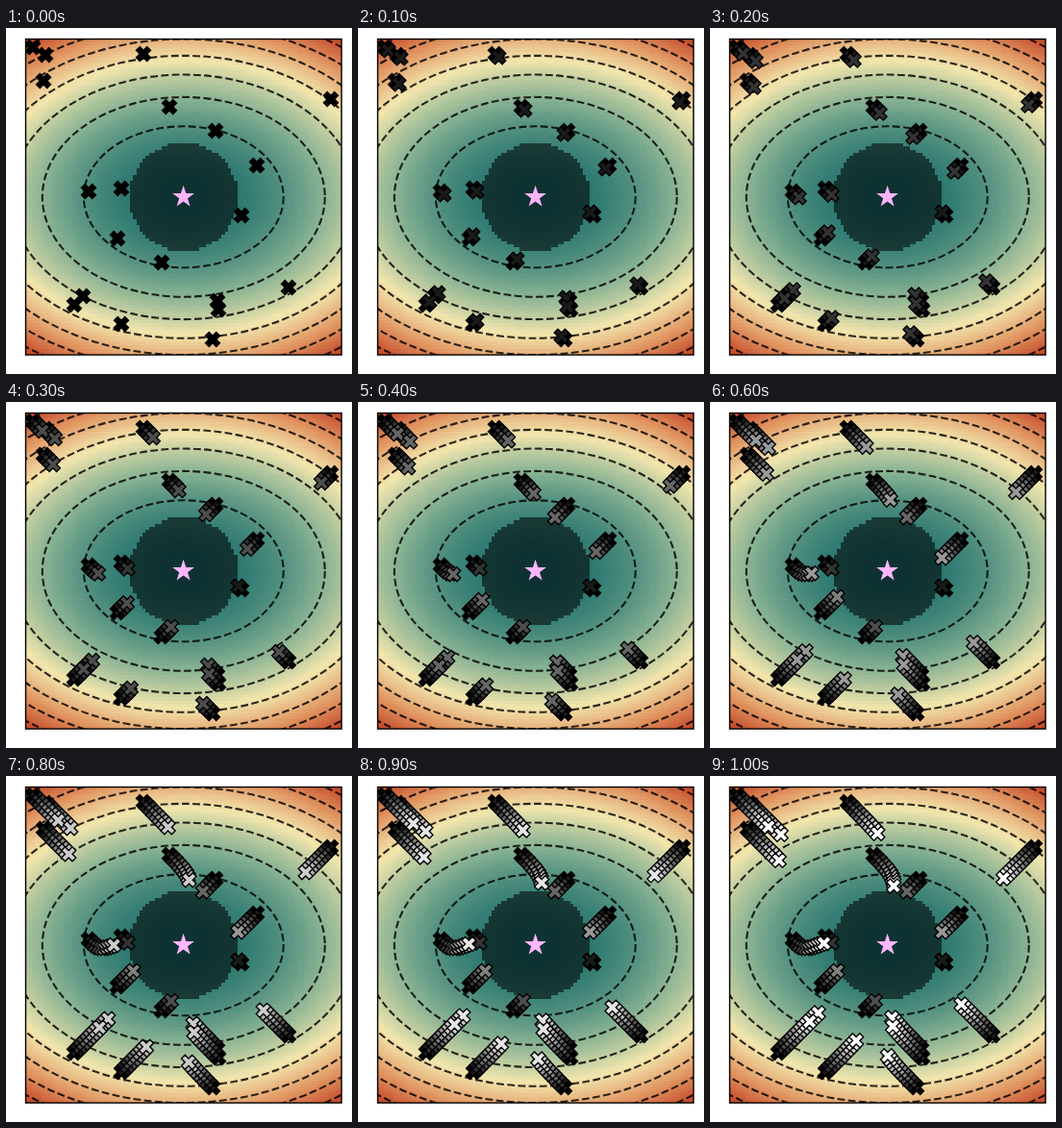
These frames come from a looping animation (360 px wide and 360 px high, 1.1 s). An HTML page with a canvas:

```html
<!DOCTYPE html>
<html>
<head>
<meta charset="utf-8">
<style>
html, body { margin: 0; width: 100%; height: 100%; overflow: hidden; background: #fff; }
canvas { display: block; width: 360px; height: 360px; }
</style>
</head>
<body>
<canvas></canvas>
<script>
const canvas = document.querySelector('canvas');
const ratio = window.devicePixelRatio || 1;
canvas.width = canvas.height = 360 * ratio;
const ctx = canvas.getContext('2d');

const left = 20.5, topEdge = 11.5, size = 328.6, cells = 100;
const cx = left + size / 2, cy = topEdge + size / 2;
const steps = 10, lr = 3.3, stopRadius = 60.5;

// Where each point begins its descent
const starts = [
  [28, 20], [41, 28], [39, 55], [143, 27], [170, 82], [338, 74], [218, 107],
  [261, 143], [86, 170], [120, 167], [245, 195], [116, 219], [162, 244],
  [80, 279], [71, 288], [120, 308], [220, 284], [221, 293], [294, 270], [215, 324]
];

function polygon(points) {
  const path = new Path2D();
  points.forEach(([x, y]) => path.lineTo(x, y));
  path.closePath();
  return path;
}

// One arm of the cross, turned four times
const cross = polygon([0, 1, 2, 3].flatMap(turn =>
  [[1, 0], [2, 1], [1, 2]].map(([x, y]) => {
    const a = turn * Math.PI / 2, c = 3.75 * Math.cos(a), s = 3.75 * Math.sin(a);
    return [x * c - y * s, x * s + y * c];
  })));

const star = polygon(Array.from({ length: 10 }, (_, i) => {
  const r = i % 2 ? 4.6 : 12, a = i * Math.PI / 5;
  return [r * Math.sin(a), -r * Math.cos(a)];
}));

// Adam descent on x² + 2y², halted near the inner region
function descend([x, y]) {
  const pos = [x - cx, y - cy], m = [0, 0], v = [0, 0];
  const trail = [[x, y]];
  for (let n = 1; n <= steps && Math.hypot(...pos) > stopRadius; n++) {
    for (let i = 0; i < 2; i++) {
      const g = pos[i];
      m[i] = 0.9 * m[i] + 0.1 * g;
      v[i] = 0.999 * v[i] + 0.001 * g * g;
      pos[i] -= lr * (m[i] / (1 - 0.9 ** n)) / Math.sqrt(v[i] / (1 - 0.999 ** n));
    }
    trail.push([pos[0] + cx, pos[1] + cy]);
  }
  return trail;
}
const trails = starts.map(descend);

function makeLayer(pixels) {
  const layer = document.createElement('canvas');
  layer.width = layer.height = pixels;
  return layer;
}

// A one-row ramp of the colour scale, sampled by loss
function makeRamp() {
  const c = makeLayer(256).getContext('2d', { willReadFrequently: true });
  const gradient = c.createLinearGradient(0, 0, 256, 0);
  ['#1c6e6c', '#85b092', '#f2e6ad', '#e0935f', '#bf3f22']
    .forEach((color, i, all) => gradient.addColorStop(i / (all.length - 1), color));
  c.fillStyle = gradient;
  c.fillRect(0, 0, 256, 1);
  return c.getImageData(0, 0, 256, 1).data;
}

function makeGrid() {
  const grid = makeLayer(cells), c = grid.getContext('2d');
  const image = c.createImageData(cells, cells), ramp = makeRamp();
  const half = cells / 2;
  for (let row = 0; row < cells; row++) {
    for (let col = 0; col < cells; col++) {
      const x = col + 0.5 - half, y = row + 0.5 - half;
      const loss = (x * x + 2 * y * y) / (3 * half * half);
      const shade = Math.hypot(x, y) < 17.2 ? 0.45 : 1;
      const from = 4 * Math.floor(loss * 255), to = 4 * (row * cells + col);
      for (let k = 0; k < 3; k++) image.data[to + k] = ramp[from + k] * shade;
      image.data[to + 3] = 255;
    }
  }
  c.putImageData(image, 0, 0);
  return grid;
}

function clipToPlot(c) {
  c.beginPath();
  c.rect(left, topEdge, size, size);
  c.clip();
}

function makeField() {
  const field = makeLayer(360 * ratio), c = field.getContext('2d');
  c.scale(ratio, ratio);
  c.fillStyle = '#fff';
  c.fillRect(0, 0, 360, 360);
  c.imageSmoothingEnabled = false;
  c.drawImage(makeGrid(), left, topEdge, size, size);
  clipToPlot(c);
  c.strokeStyle = 'rgba(0,0,0,0.82)';
  c.lineWidth = 2.1;
  c.setLineDash([7.8, 3.4]);
  for (let level = 1; level <= 7; level++) {
    const rx = Math.sqrt(level * 10800);
    c.beginPath();
    c.ellipse(cx, cy, rx, rx / Math.SQRT2, 0, 0, 2 * Math.PI);
    c.stroke();
  }
  return field;
}

const field = makeField();
ctx.scale(ratio, ratio);
ctx.strokeStyle = '#000';
ctx.lineWidth = 1.4;

function drawCross([x, y], step) {
  const gray = Math.round(255 * step / steps);
  ctx.save();
  ctx.translate(x, y);
  ctx.fillStyle = `rgb(${gray},${gray},${gray})`;
  ctx.fill(cross);
  ctx.stroke(cross);
  ctx.restore();
}

function draw(time) {
  const current = Math.floor(time % 1100 / 100);
  ctx.drawImage(field, 0, 0, 360, 360);

  ctx.save();
  clipToPlot(ctx);
  for (let step = 0; step <= current; step++)
    for (const trail of trails)
      if (trail[step]) drawCross(trail[step], step);
  ctx.translate(cx - 0.2, cy);
  ctx.fillStyle = '#ffb5fb';
  ctx.fill(star);
  ctx.restore();

  ctx.strokeRect(left, topEdge, size, size);
}

const begin = performance.now();
function tick() {
  draw(performance.now() - begin);
  requestAnimationFrame(tick);
}
tick();
</script>
</body>
</html>
```
